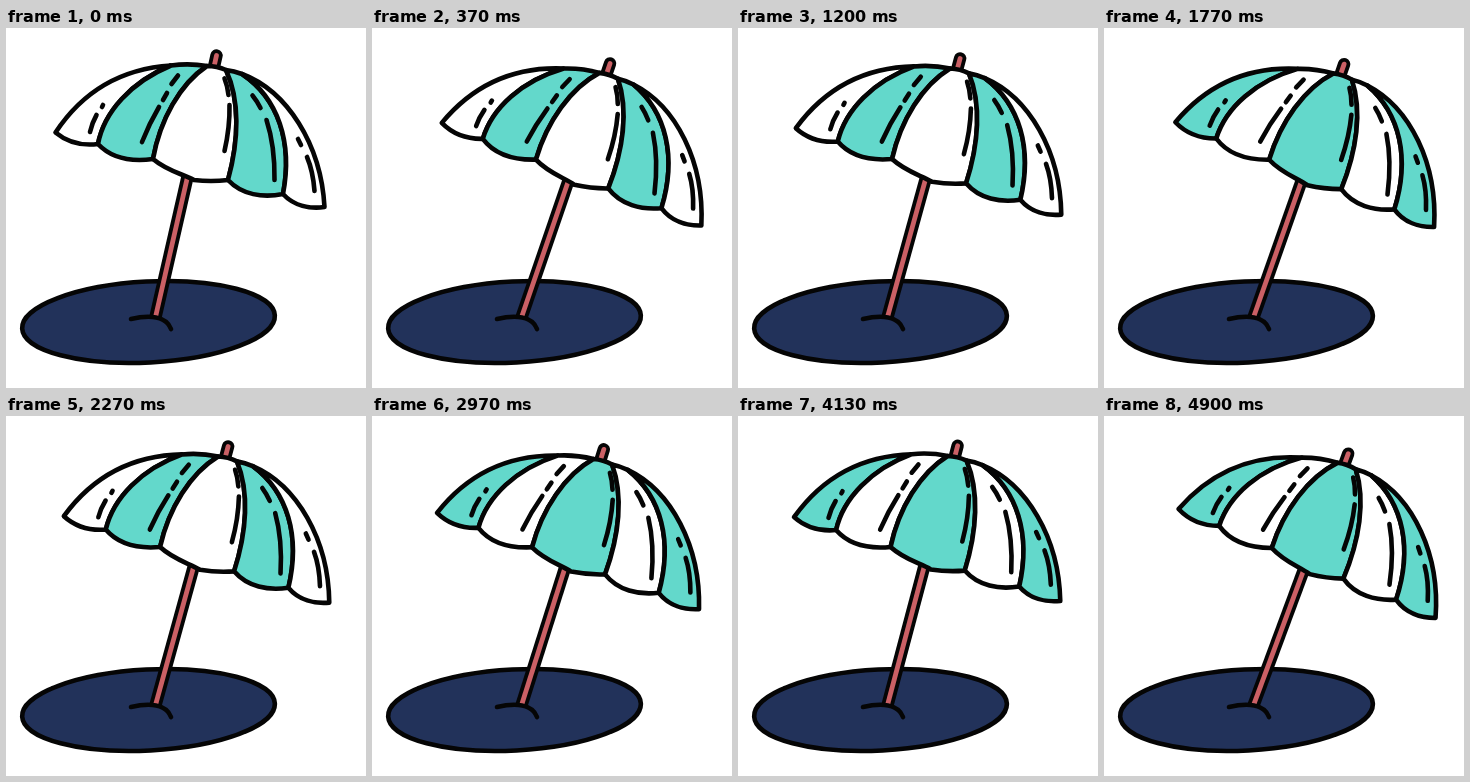
An HTML page that plays this animation: 360 by 360 pixels, repeating every 5 s.

```html
<!DOCTYPE html>
<html lang="en">
<head>
<meta charset="utf-8">
<title>Beach umbrella</title>
<style>
  html, body { margin: 0; width: 100%; height: 100%; overflow: hidden; background: #fff; }
  svg { display: block; width: 100vw; height: 100vh; }
  .line { fill: none; stroke: #050505; stroke-width: 4.6; stroke-linecap: round; stroke-linejoin: round; }
  .edge { stroke: #050505; stroke-width: 4.6; stroke-linejoin: round; }
  .sand { fill: #22325a; }
  .odd { fill: #fff; }
  .even { fill: #63d8cb; }
  .flip .odd { fill: #63d8cb; }
  .flip .even { fill: #fff; }
  .rim { stroke: #050505; stroke-width: 12.4; }
  .wood { stroke: #cb6065; stroke-width: 4.8; }
  .round { stroke-linecap: round; }
</style>
</head>
<body>
<svg viewBox="0 0 360 360">
  <ellipse class="edge sand" cx="142.5" cy="294" rx="126.5" ry="40.5" transform="rotate(-3 142.5 294)"/>
  <g id="umbrella">
    <path class="rim" d="M149.300 290L181.700 148"/>
    <path class="wood" d="M149.500 289L181.700 148"/>
    <path class="rim round" d="M207.500 41L210.500 27.500"/>
    <path class="wood round" d="M207.500 41L210.500 27.500"/>
    <g class="edge">
      <path class="odd" d="M49.500 104.500C73 69 110 41 165 37.500C125 54 98 84 92 116C76 118 61 114 49.500 104.500Z"/>
      <path class="even" d="M92 116C98 84 125 54 165 37.500Q183 35 201 38C174 56 154 92 147 131C124 134 105 130 92 116Z"/>
      <path class="odd" d="M147 131C154 92 174 56 201 38Q211 38 220 42C234 72 233 112 222 152Q205 154 188 152C177 146 161 143 147 131Z"/>
      <path class="even" d="M222 152C233 112 234 72 220 42Q228 43 236 46C272 70 287 114 277 166C257 170 236 167 222 152Z"/>
      <path class="odd" d="M277 166C287 114 272 70 236 46C281 63 315 116 318.500 179C304 181 288 178 277 166Z"/>
    </g>
    <path class="line" d="M84 104Q86 95 90.500 87M96 79L97 77
      M136 114Q143 96 153 79M157 72L161 65M165.500 56L172 47.500
      M218.500 123Q224 99 223.500 77M222.500 67Q221.500 58 218.500 50.500
      M268.500 152Q269 118 260.500 92M254.500 80Q251 73 246.500 67.500
      M308.500 163Q307 143 301 129M295 117L292 111"/>
  </g>
  <path class="line" d="M125 291C143 287 160 288 165 301"/>
</svg>
<script>
  const LOOP = 5000, TICK = 1000 / 30, SWING = 32;
  // [tick within a swing, lean in degrees]
  const LEAN = [[0, 0], [4, 2.55], [11, 6.1], [16, 9.3], [19, 7.5], [25, 4.7], [28, 2], [32, 0]];
  const umbrella = document.getElementById('umbrella');

  // Poses hold for two ticks, with one three-tick hold in every 21
  function hold(tick) {
    const r = tick % 21;
    return tick - r + (r < 3 ? 0 : r - 1 + r % 2);
  }

  function lean(p) {
    const i = LEAN.findIndex(k => k[0] > p);
    const [x0, y0] = LEAN[i - 1], [x1, y1] = LEAN[i];
    return y0 + (y1 - y0) * (p - x0) / (x1 - x0);
  }

  function draw(now) {
    // Switch times are rounded to 10 ms, so allow a little slack
    const tick = Math.floor((now % LOOP) / TICK + 0.12);
    const phase = hold(tick) % SWING;
    umbrella.setAttribute('transform', `rotate(${lean(phase)} 150 290)`);
    umbrella.classList.toggle('flip', phase >= SWING / 2);
  }

  let start;
  function loop(now) {
    start ??= now;
    draw(now - start);
    requestAnimationFrame(loop);
  }
  draw(0);
  requestAnimationFrame(loop);
</script>
</body>
</html>
```
